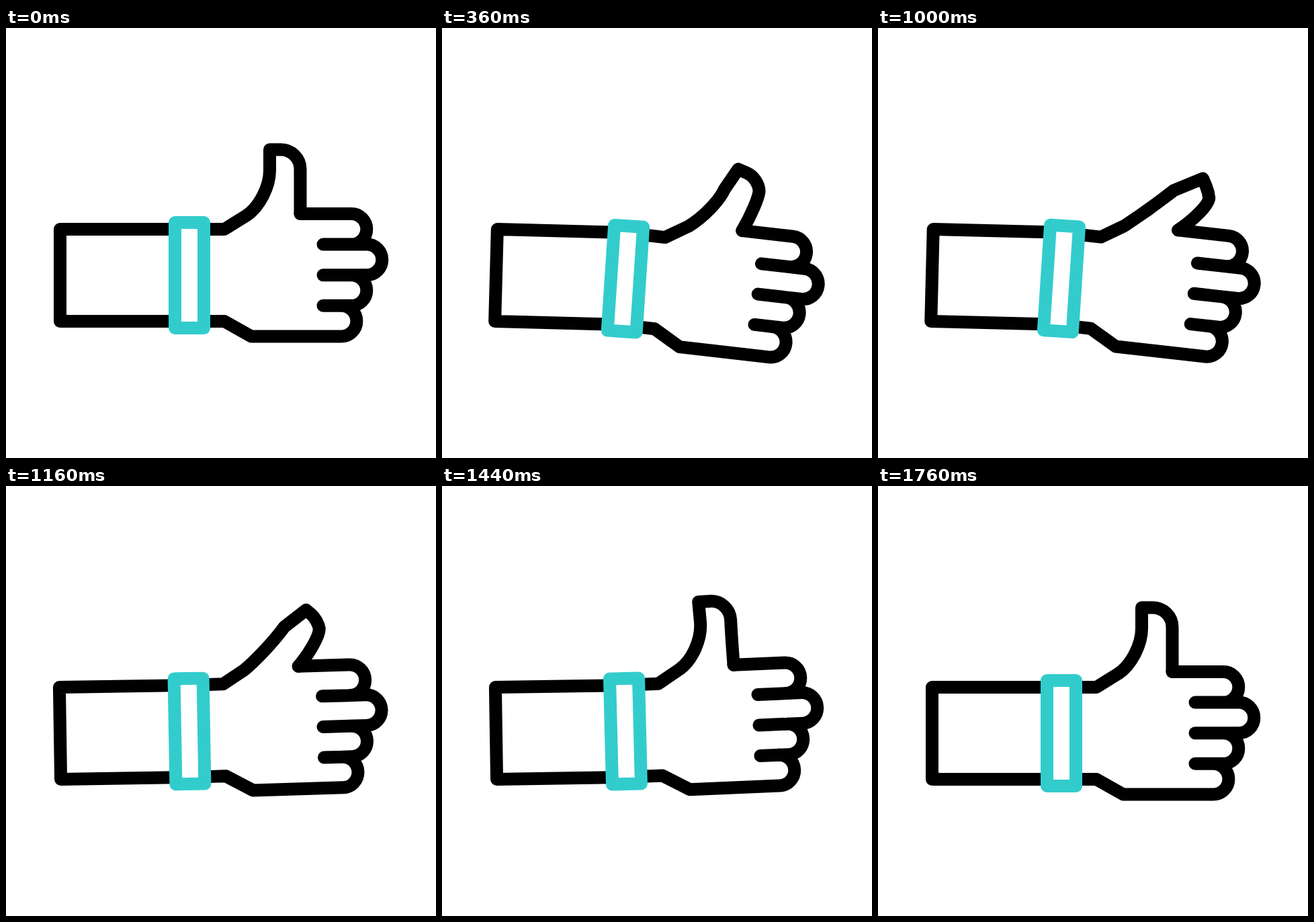
Animation of 640x640 px, one loop 2.08 s. Source, as an HTML page:

```html
<!DOCTYPE html>
<html lang="en">
<head>
<meta charset="utf-8">
<title>Thumbs up</title>
<style>
  html, body { margin: 0; height: 100%; overflow: hidden; background: #fff; }
  svg { display: block; width: 100vw; height: 100vh; }
  path, rect { fill: none; stroke: #000; stroke-width: 19; stroke-linejoin: round; stroke-linecap: round; }
  #band { stroke: #33cccc; fill: #fff; }
</style>
</head>
<body>
<svg viewBox="0 0 640 640">
  <path id="arm" d="M250 299.5H80.5V436.5H250"/>
  <g id="hand">
    <path id="thumb"/>
    <path d="M438 276.5H514a22.8 22.8 0 0 1 0 45.6M472 322.1H537a22.8 22.8 0 0 1 0 45.6H472
             M514 367.7a22.8 22.8 0 0 1 0 45.6H472M499 413.3a22.8 22.8 0 0 1 0 45.7H365L325 436.5H296"/>
  </g>
  <rect id="band" x="251.5" y="289.5" width="43" height="157"/>
</svg>
<script>
const LOOP = 2080, STEP = 40;
const ARM_LENGTH = 192.5;
const byId = id => document.getElementById(id);
const arm = byId('arm'), hand = byId('hand'), band = byId('band'), thumb = byId('thumb');

// Thumb poses as points: side bend, side end, tip, pad corner, knuckle
const upright = [[392.5, 256], [392.5, 212], [392.5, 181], [438, 181], [438, 210]];
const leaning = [[395, 247], [418, 225.5], [453.5, 192], [472, 213], [476.5, 222]];
const folded = [[393, 250], [425, 218.5], [466, 196], [476.5, 215], [478.5, 224]];
const root = [358, 279], base = [438, 276.5];

const mix = (a, b, k) => a.map((v, i) => v + (b[i] - v) * k);
const distance = (a, b) => Math.hypot(a[0] - b[0], a[1] - b[1]);

// Round the corner k between a and b
const corner = (a, k, b) => `C${mix(a, k, .55)} ${mix(b, k, .55)} ${b}`;

function thumbPath(lean, fold) {
  const [bend, side, tip, pad, knuckle] = upright.map((p, i) =>
    p.map((v, j) => v + lean * (leaning[i][j] - v) + fold * (folded[i][j] - v)));
  const padStart = mix(pad, tip, distance(pad, knuckle) / distance(pad, tip));
  const inner = [knuckle[0], knuckle[1] + 19];
  return `M296 299.5H325L${root}${corner(root, bend, side)}L${tip}L${padStart}`
    + corner(padStart, pad, knuckle) + corner(knuckle, inner, base);
}

// Eased progress 0..1 from start to end; skew above 1 delays it, below 1 hurries it
function progress(t, start, end, skew = 1, power = 2) {
  const x = Math.min(1, Math.max(0, (t - start) / (end - start))) ** skew;
  return x < .5 ? (2 * x) ** power / 2 : 1 - (2 - 2 * x) ** power / 2;
}

function draw(now) {
  const t = Math.floor(now % LOOP / STEP) * STEP;
  const down = progress(t, 0, 560, 1, 3);
  const up = progress(t, 820, 1280, 1.5);
  const back = progress(t, 1280, 1760, .6);
  const curl = progress(t, 820, 1000);

  const armTurn = 1.9 * (down - 2 * up + back);
  const handTurn = 8 * down - 13.3 * up + 5.3 * back;
  const lean = progress(t, 0, 600, 1.4) - curl;
  const fold = curl - 1.08 * progress(t, 1000, 1320, 1.75) + .08 * back;

  const angle = armTurn * Math.PI / 180;
  const x = 80.5 + ARM_LENGTH * Math.cos(angle), y = 368 + ARM_LENGTH * Math.sin(angle);
  const place = (part, px, py, turn) =>
    part.setAttribute('transform', `translate(${px} ${py}) rotate(${turn}) translate(-273 -368)`);

  arm.setAttribute('transform', `rotate(${armTurn} 80.5 368)`);
  place(band, x, y, handTurn * .58);
  place(hand, x - .07 * handTurn, y + .08 * handTurn, handTurn);
  thumb.setAttribute('d', thumbPath(lean, fold));
}

const start = performance.now();
function tick() {
  draw(performance.now() - start);
  requestAnimationFrame(tick);
}
tick();
</script>
</body>
</html>
```
